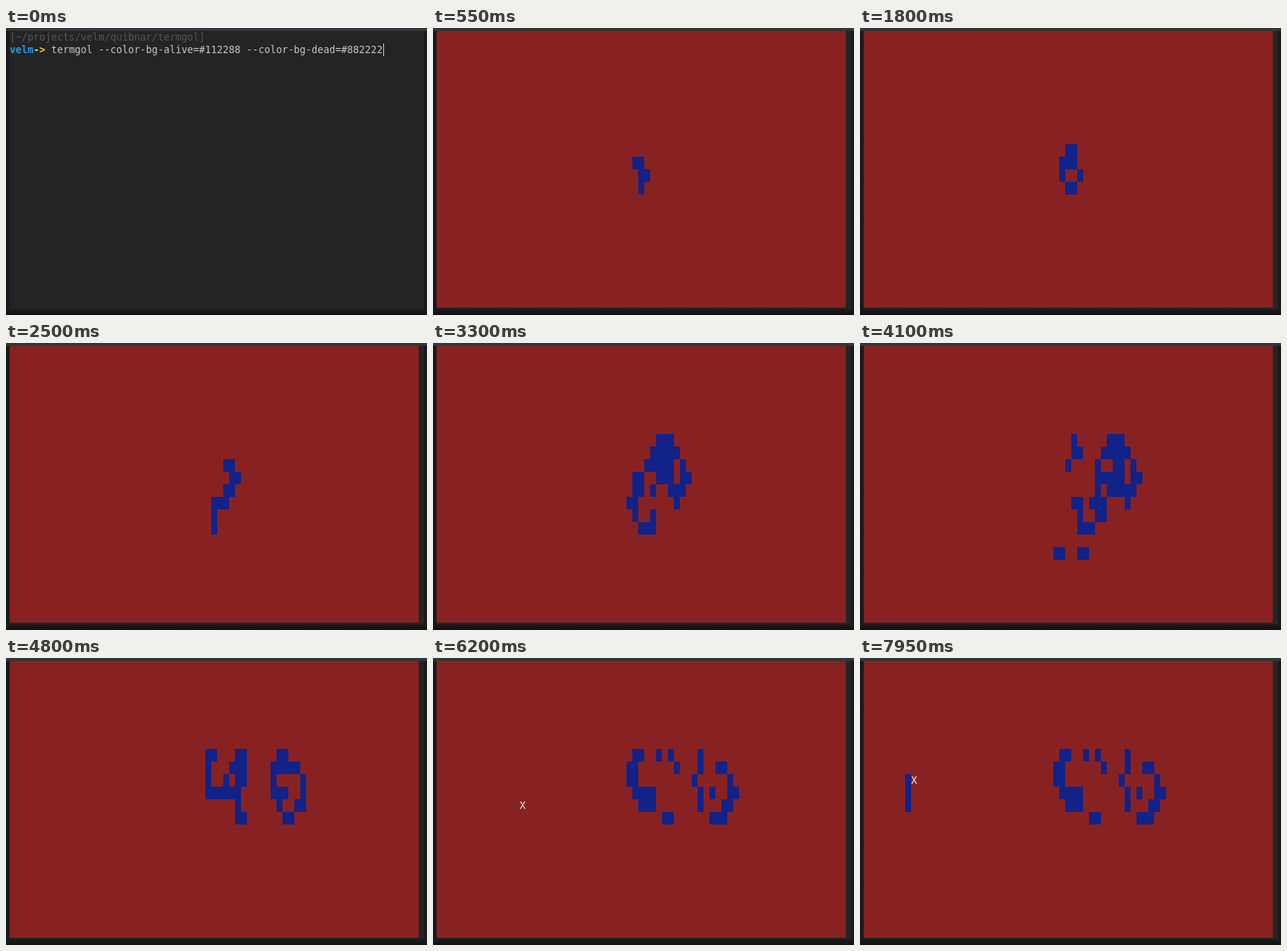
These frames come from a looping animation (568 px wide and 388 px high, 8 s). An HTML page:

```html
<!DOCTYPE html>
<html lang="en">
<head>
<meta charset="utf-8">
<title>Game of Life in a terminal</title>
<style>
  html, body { margin: 0; width: 100%; height: 100%; overflow: hidden; background: #232425; }
  svg { display: block; width: 568px; height: 388px; }
  rect, path { shape-rendering: crispEdges; }
  text { font: 13.288px "DejaVu Sans Mono", "Liberation Mono", monospace; white-space: pre; }
  .bold { font-weight: bold; }
</style>
</head>
<body>
<svg viewBox="0 0 568 388">
  <defs>
    <linearGradient id="below" x2="0" y2="1">
      <stop offset="0" stop-color="#1b1c1d"/>
      <stop offset="1" stop-color="#0f1011"/>
    </linearGradient>
    <linearGradient id="beside">
      <stop offset="0" stop-color="#151617"/>
      <stop offset="1" stop-color="#1c1d1e"/>
    </linearGradient>
  </defs>
  <rect width="568" height="388" fill="#232425"/>
  <rect y="4" width="5" height="384" fill="url(#beside)"/>
  <rect x="564" y="4" width="4" height="384" fill="#18191b"/>
  <rect y="380" width="568" height="8" fill="url(#below)"/>
  <rect width="568" height="4" fill="#333638"/>

  <g id="shell">
    <text x="5" y="17" fill="#555655">[~/projects/velm/quibnar/termgol]</text>
    <text x="5" y="34" fill="#c4c7c4"><tspan class="bold" fill="#2a9ae6">velm</tspan><tspan class="bold" fill="#f2d21f">-&gt;</tspan> termgol --color-bg-alive=#112288 --color-bg-dead=#882222</text>
    <rect x="509" y="21" width="1" height="17" fill="#d8dad8"/>
  </g>

  <g id="game">
    <rect x="5" y="4" width="552" height="374" fill="#882222"/>
    <path id="cells" fill="#112288"/>
    <text id="cursor" fill="#f0f0f0">X</text>
  </g>
</svg>
<script>
const LOOP = 8000;
const COLS = 69, ROWS = 22, CELL_W = 8, CELL_H = 17, LEFT = 5, TOP = 4;
const GENERATIONS = 34;
const byId = id => document.getElementById(id);
const shell = byId('shell'), game = byId('game'), cells = byId('cells'), cursor = byId('cursor');

const key = (col, row) => (row + ROWS) % ROWS * COLS + (col + COLS) % COLS;

function nextGeneration(alive) {
  const neighbours = new Map();
  for (const k of alive) {
    const col = k % COLS, row = Math.floor(k / COLS);
    for (let dy = -1; dy <= 1; dy++) {
      for (let dx = -1; dx <= 1; dx++) {
        if (!dx && !dy) continue;
        const n = key(col + dx, row + dy);
        neighbours.set(n, (neighbours.get(n) || 0) + 1);
      }
    }
  }
  return new Set([...neighbours]
    .filter(([k, count]) => count === 3 || (count === 2 && alive.has(k)))
    .map(([k]) => k));
}

const rPentomino = [[33, 10], [34, 10], [34, 11], [35, 11], [34, 12]];
const history = [new Set(rPentomino.map(([col, row]) => key(col, row)))];
while (history.length <= GENERATIONS) history.push(nextGeneration(history.at(-1)));

// Cells switched on by hand while the game is paused
const edits = [[6700, 7, 11], [7150, 7, 10], [7550, 7, 9]];

function cursorAt(t) {
  if (t < 5000) return null;
  if (t < 5450) return [34, 11];
  if (t < 5750) return [33, 11];
  if (t < 7000) {
    const ticks = Math.floor((t - 5750) / 50) + 1;
    return [Math.max(7, 34 - 2 * ticks), 11];
  }
  if (t < 7400) return [7, 10];
  return [t < 7950 ? 7 : 8, 9];
}

function cellPath(k) {
  const x = LEFT + k % COLS * CELL_W, y = TOP + Math.floor(k / COLS) * CELL_H;
  return `M${x} ${y}h${CELL_W}v${CELL_H}h${-CELL_W}z`;
}

function render(t) {
  shell.style.display = t < 500 ? '' : 'none';
  game.style.display = t < 550 ? 'none' : '';

  const generation = Math.min(GENERATIONS, Math.max(0, Math.floor((t - 1500) / 100)));
  const edited = edits.filter(([time]) => t >= time).map(([, col, row]) => key(col, row));
  cells.setAttribute('d', [...history[generation], ...edited].map(cellPath).join(''));

  const position = cursorAt(t);
  cursor.style.display = position ? '' : 'none';
  if (position) {
    cursor.setAttribute('x', LEFT + position[0] * CELL_W);
    cursor.setAttribute('y', TOP + position[1] * CELL_H + 13);
  }
}

function frame() {
  render(performance.now() % LOOP);
  requestAnimationFrame(frame);
}
frame();
</script>
</body>
</html>
```
